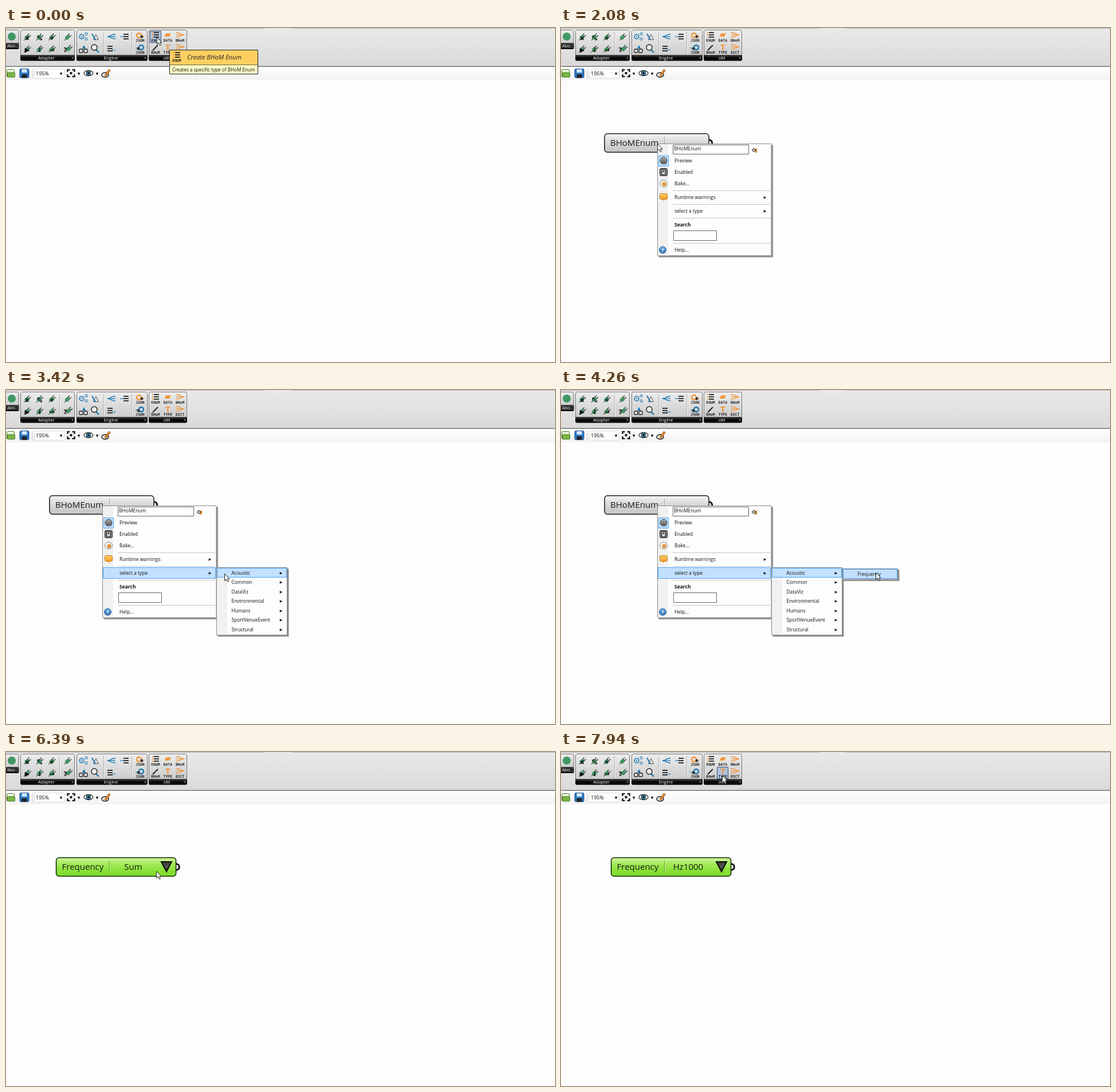
These frames come from a looping animation (958 px wide and 584 px high, 8000 ms). An HTML page with a canvas:

```html
<!DOCTYPE html>
<html lang="en">
<head>
<meta charset="utf-8">
<title>Enum component</title>
<style>
html, body { margin: 0; width: 100%; height: 100%; overflow: hidden; background: #fdfdfd; }
canvas { display: block; }
</style>
</head>
<body>
<canvas id="stage" width="958" height="584"></canvas>
<script>
const LOOP = 8000, STEP = 78, PITCH = 16.55;
const ctx = document.getElementById('stage').getContext('2d');
const BLUE = '#1b78b4', ORANGE = '#f0963c', GREEN = '#3f9864', INK = '#1a1a1a';
const HOVER = '#c2e0ff', HOVER_EDGE = '#4ba3f5';

const CONTEXT = { x: 168, y: 202, w: 199.5, h: 196.5 };
const TYPES = { x: 367, y: 310, w: 124, arrows: true, rows: ['Acoustic', 'Common', 'DataViz', 'Environmental', 'Humans', 'SportVenueEvent', 'Structural'] };
const FREQUENCY = { x: 491, y: 312, w: 97, rows: ['Frequency'] };
const BANDS = [63, 125, ...Array.from({ length: 7 }, (_, i) => 250 * 2 ** i)];
const VALUES = { x: 265, y: 199, w: 90, rows: ['Sum', ...BANDS.map(hz => 'Hz' + hz)] };

const START = { x: 263, y: 16 };
const TIME = { drag: 680, drop: 1570, context: 2080, types: 2940, frequency: 3810, typed: 4640, select: 5610, values: 6610, valued: 7550 };
const glides = [
  { from: TIME.drag, to: 1150, x: CONTEXT.x, y: CONTEXT.y },
  { from: 2260, to: 2540, x: 222, y: 320 },
  { from: 3170, to: 3660, x: 421, y: 321 },
  { from: TIME.frequency, to: 4260, x: 549, y: 319 },
  { from: 4810, to: 5530, x: 251, y: 197 },
  { from: 5760, to: 6150, x: 256, y: 288 },
  { from: 6150, to: 6540, x: 263, y: 198 },
  { from: TIME.values, to: 7240, x: 281, y: 289 },
  { from: TIME.valued, to: 7940, x: 281, y: 41 }
];

// ---- drawing helpers ----
function paint(fill, stroke, width = 1) {
  if (fill) { ctx.fillStyle = fill; ctx.fill(); }
  if (stroke) { ctx.strokeStyle = stroke; ctx.lineWidth = width; ctx.stroke(); }
}
function box(x, y, w, h, fill, stroke, radius = 0, width = 1) {
  ctx.beginPath();
  ctx.roundRect(x, y, w, h, radius);
  paint(fill, stroke, width);
}
function oval(x, y, rx, ry, fill, stroke, width) {
  ctx.beginPath();
  ctx.ellipse(x, y, rx, ry, 0, 0, Math.PI * 2);
  paint(fill, stroke, width);
}
const disc = (x, y, r, fill, stroke, width) => oval(x, y, r, r, fill, stroke, width);
function line(x, y, dx, dy, color, width) {
  ctx.beginPath();
  ctx.moveTo(x, y);
  ctx.lineTo(x + dx, y + dy);
  paint(null, color, width);
}
function text(str, x, y, size = 8.5, color = '#111', style = '', align = 'left', family = '"Open Sans", sans-serif') {
  ctx.font = `${style} ${size}px ${family}`;
  ctx.textAlign = align;
  ctx.fillStyle = color;
  ctx.fillText(str, x, y);
}
function glyph(char, x, y, size, color = '#111', style = '') {
  ctx.textBaseline = 'middle';
  text(char, x, y, size, color, style, 'center', '"DejaVu Sans", sans-serif');
  ctx.textBaseline = 'alphabetic';
}
const tag = (str, x, y) => text(str, x, y, 6.4, '#222', 'bold', 'center', '"DejaVu Sans Mono", monospace');
function shade(y, h, ...colors) {
  const g = ctx.createLinearGradient(0, y, 0, y + h);
  colors.forEach((c, i) => g.addColorStop(i / (colors.length - 1), c));
  return g;
}

// ---- icons, each around its centre ----
function plug(x, y) {
  ctx.save();
  ctx.translate(x, y);
  ctx.rotate(-Math.PI / 4);
  line(-8, 0, 8, 0, '#555', 1.3);
  box(-4.5, -3, 8, 6, GREEN, '#32704c', 3, .7);
  for (const side of [-2, 2]) line(3, side, 4, 0, '#333', 1.3);
  ctx.restore();
}
function bars(x, y, bullets) {
  for (const row of [-4, 0, 4]) {
    line(x - 3, y + row, 9, 0, '#333', 2);
    if (bullets) line(x - 6, y + row, 2, 0, ORANGE, 2);
  }
}
function fork(x, y, dir, color) {
  for (const arm of [-4, 0, 4]) {
    ctx.beginPath();
    ctx.moveTo(x - 7 * dir, y);
    ctx.bezierCurveTo(x, y, x - 3 * dir, y + arm, x + 7 * dir, y + arm);
    paint(null, color, 1.3);
  }
}
function json(x, y, color, side) {
  disc(x - side * 2, y - 2, 4, null, color, 2.4);
  disc(x + side * 3, y, 2.5, '#333');
  line(x + side * 4, y - 1, side * 4, 0, color, 1.2);
  tag('JSON', x, y + 8.5);
}
function cubes(x, y) {
  glyph('▲', x + 1, y - 4, 8, BLUE);
  for (const side of [-4, 4]) box(x + side - 3, y, 6, 6, '#ddd', '#222', 1, 1.3);
}
function magnifier(x, y) {
  line(x + 2, y + 2, 5, 5, BLUE, 2.4);
  disc(x - 1, y - 2, 5, '#eee', '#222', 1.4);
}
function enumIcon(x, y) {
  bars(x, y - 3, true);
  tag('ENUM', x, y + 8.5);
}

// ---- ribbon ----
function group(x, w, label, dividers) {
  box(x + .5, 3.5, w - 1, 53, shade(3, 47, '#ededed', '#cbcbcb'), '#777', 3);
  box(x, 47, w, 10.5, shade(47, 10, '#4a4a4a', '#050505', '#111'), null, [0, 0, 3, 3]);
  text(label, x + w / 2 - 2, 55, 7.8, '#fff', '', 'center');
  text('+', x + w - 4, 55, 8, '#ddd', '', 'center');
  for (const d of dividers) {
    line(x + d, 7, 0, 38, '#b2b2b2', 1);
    line(x + d + 1, 7, 0, 38, '#f3f3f3', 1);
  }
}

function adapterIcons() {
  [...'x⤡+ ▶↓→?'].forEach((mark, i) => {
    const col = i % 4, x = 37 + 21.5 * col + (col > 2 ? 6 : 0), y = 16 + 21 * (i >> 2);
    if (mark !== '?') plug(x, y);
    else plug(x + 2, y - 1);
    glyph(mark, x - (mark === '?' ? 4 : 0), y + 2, 11, '#111', 'bold');
  });
}

function engineIcons() {
  glyph('⚙', 132, 16, 14, BLUE, 'bold');
  for (const y of [11, 20]) glyph('⚙', 140, y, 8, BLUE, 'bold');
  glyph('△', 157, 16, 13, '#222');
  line(150, 10, 6, 11, BLUE, 2);
  fork(184, 15, 1, BLUE);
  bars(208, 15);
  line(199, 15, 6, 0, BLUE, 1.2);
  cubes(135, 37);
  magnifier(155, 36);
  bars(180, 36);
  glyph('→', 188, 39, 8, BLUE);
  json(234, 15, ORANGE, 1);
  json(234, 36, BLUE, -1);
}

function objectIcons(hot) {
  ['ENUM', 'DATA', 'BHoM', 'BHoM', 'TYPE', 'DICT'].forEach((name, i) => {
    const x = 261 + 21.3 * (i % 3), y = 15 + 21 * Math.floor(i / 3);
    if (name === hot) box(Math.round(x) - 9.5, y - 9.5, 19, 20, '#b0c2de', '#42536f');
    if (i === 0) bars(x, y - 3, true);
    else if (i === 1) glyph('▰', x, y - 3, 15, ORANGE);
    else if (i === 3) line(x - 5, y + 3, 9, -9, '#222', 2);
    else if (i === 4) text('T', x, y + 3, 15, ORANGE, 'bold', 'center');
    else fork(x, y - 3, -1, ORANGE);
    tag(name, x, y + 8.5);
  });
}

function ribbon(hot) {
  box(0, 0, 958, 67, shade(0, 67, '#e9e9e9', '#dadada'));
  box(0, 0, 958, 1, '#b2b2b2');
  box(451, 0, 47, 1, '#e2e2e2');
  box(0, 66.5, 958, 1.5, '#747474');
  box(-8, 3.5, 30, 33, shade(3, 27, '#ededed', '#c9c9c9'), '#777', 3);
  box(-8, 26, 30.5, 11, shade(26, 11, '#444', '#050505'), null, 2);
  text('Abo...', 2, 34, 7.5, '#fff');
  disc(10, 15, 7, GREEN);
  group(25, 95, 'Adapter', [68.5]);
  group(123, 124, 'Engine', [47.5, 96.5]);
  group(249, 67, 'oM', []);
  adapterIcons();
  engineIcons();
  objectIcons(hot);
}

function toolbar() {
  box(0, 68, 958, 23.5, shade(68, 23, '#fff', '#f2f2f2'));
  box(1.5, 72.5, 13, 13, '#e8f4d8', '#487828', 1);
  box(2.5, 78, 13, 8, '#79b843', '#487828', 1);
  box(24, 71.5, 16, 15.5, '#2b77c4', '#174a88', 2);
  box(27.5, 72, 9, 6, '#d5e7f7');
  box(27.5, 81, 9, 6, '#222');
  line(46, 71, 0, 17, '#ccc', 1);
  box(49.5, 71.5, 52, 16, '#fff', '#ddd');
  text('195%', 52, 83, 9);
  for (const x of [96, 127, 159]) glyph('▼', x, 80, 6);
  for (const sx of [-1, 1]) for (const sy of [-1, 1]) {
    line(113.5 + sx * 7, 79 + sy * 6, -sx * 5, 0, '#222', 2.4);
    line(113.5 + sx * 6, 79 + sy * 7, 0, -sy * 5, '#222', 2.4);
  }
  box(111.5, 77, 4, 4, '#222');
  oval(144, 79, 8, 4.5, '#fff', '#333', 1.3);
  disc(144, 79, 4, '#3a7fae', '#244');
  disc(144, 79, 1.8, '#111');
  oval(173, 82, 6, 4, null, '#222', 1.5);
  line(173, 84, 8, -11, '#8a4a18', 4);
  line(173, 84, 8, -11, '#dd8b35', 2.6);
}

function tooltip() {
  box(285.5, 38.5, 154, 42, '#ffffc8', '#222');
  box(286, 39, 153, 25, '#ffd061');
  line(286, 64.5, 153, 0, '#6e6034', 1);
  enumIcon(298, 50);
  text('Create BHoM Enum', 316, 55, 11.1, '#222', 'italic');
  text('Creates a specific type of BHoM Enum', 290, 76, 8.2);
}

// ---- canvas component ----
function component(x, right, name, value, green) {
  const top = 184.8, w = right - x;
  ctx.beginPath();
  ctx.arc(right + .5, 201, 5.3, -Math.PI / 2, Math.PI / 2);
  paint('#fff', '#111', 3);
  const fill = green
    ? shade(top, 32, '#d0f6a0', '#a4ea5c', '#8ce23a', '#7dda2c')
    : shade(top, 32, '#f5f5f5', '#e0e0e0', '#d0d0d0', '#c5c5c5');
  box(x, top, w, 32.4, fill, green ? '#12300a' : '#222', 5, 1.6);
  line(180.5, 190, 0, 22, green ? '#5fa324' : '#999', 1);
  line(181.5, 190, 0, 22, green ? '#c9f59a' : '#f2f2f2', 1);
  text(name, x + 10, 206, 15, INK);
  if (!value) return;
  text(value, 222, 206, 15, INK, '', 'center');
  ctx.beginPath();
  ctx.moveTo(271, 192);
  ctx.lineTo(289, 192);
  ctx.lineTo(280, 209);
  ctx.closePath();
  paint(shade(191, 19, '#333', '#555', '#222'), '#0c0c0c', 2);
}

// ---- menus ----
function panel({ x, y, w, h }) {
  box(x + 3, y + 3, w, h, 'rgba(0,0,0,.18)');
  box(x + 2, y + 2, w, h, 'rgba(0,0,0,.35)');
  box(x + .5, y + .5, w - 1, h - 1, '#fdfdfd', '#8c8c8c');
  box(x + 1, y + 1, 18, h - 2, '#f1f1f1');
}
const highlight = (x, y, w, h) => box(x + .5, y + .5, w - 1, h - 1, HOVER, HOVER_EDGE);

function listMenu({ x, y, w, rows, arrows }, cursor) {
  panel({ x, y, w, h: rows.length * PITCH + 3 });
  let hot = Math.floor((cursor.y - y - 1) / PITCH);
  if (cursor.x < x + 1) hot = -1;
  else if (cursor.x > x + w) hot = 0;
  rows.forEach((label, i) => {
    const top = Math.floor(y + 1 + i * PITCH);
    if (i === hot) highlight(x + 1, top, w - 2, 17);
    text(label, x + 26.5, top + 11.7, 8.4);
    if (arrows) glyph('▶', x + w - 11, top + 9, 6);
  });
}

function valueMenu(cursor) {
  listMenu(VALUES, cursor);
  highlight(VALUES.x + 2, VALUES.y + 2, 15, 15);
  glyph('✓', VALUES.x + 9.5, VALUES.y + 9.5, 9);
}

const menuIcons = {
  'Preview'(x, y) {
    highlight(x - 9, y - 9, 18, 19);
    disc(x, y, 6, shade(y - 6, 12, '#aaa', '#555'), '#444');
    box(x - 1, y + 2, 6, 4, '#666');
  },
  'Enabled'(x, y) {
    box(x - 6.5, y - 6.5, 13, 13, '#777', '#333', 2);
    box(x - 3, y - 4.5, 6, 9, '#ddd', '#222');
    box(x - 1, y - 3, 2, 3, '#222');
  },
  'Bake...'(x, y) {
    oval(x, y, 6.5, 6, '#f7f3ea', '#8c8478');
    disc(x + 1, y + 1, 3, ORANGE, '#c77d1d');
  },
  'Runtime warnings'(x, y) {
    glyph('▼', x, y + 4, 7, '#f39a25');
    box(x - 6.5, y - 6.5, 13, 10, shade(y - 6, 10, '#ffcb62', '#f39a25'), '#c57b20', 2);
  },
  'Help...'(x, y) {
    disc(x - 1.5, y, 6, shade(y - 6, 12, '#6ab5ec', '#2868b0'), '#2f6598');
    text('?', x - 1.5, y + 3.5, 9.5, '#fff', 'bold', 'center');
  }
};

function contextMenu(cursor, open) {
  const { x, y } = CONTEXT;
  panel(CONTEXT);
  box(195.5, 204.5, 132, 16, '#fff', '#666');
  text('BHoMEnum', 197, 214);
  box(339, 211, 3, 7, '#d88428');
  glyph('◆', 336.5, 213, 10, '#333');
  glyph('◆', 336.5, 213, 6, '#ddd');

  let mid = y + 10;
  for (const row of ['Preview', 'Enabled', 'Bake...', '-', 'Runtime warnings', '-', 'select a type', '-', 'Search', '', '-', 'Help...']) {
    if (row === '-') {
      line(195, mid + 12.5, 170, 0, '#c4c4c4', 1);
      mid += 4;
      continue;
    }
    mid += 20;
    const heading = row === 'Search', submenu = /warnings|type/.test(row);
    const under = cursor.x >= x && Math.abs(cursor.y - mid) < 10;
    if (row && !heading && (open ? row === 'select a type' : under)) highlight(x + 1, mid - 10, 197, 20);
    if (row) text(row, x + 30, mid + 3, 8.5, '#111', heading ? 'bold' : '');
    else box(x + 28.5, mid - 9.5, 75, 17, '#fff', '#666');
    if (submenu) glyph('▶', x + 188, mid, 6);
    menuIcons[row]?.(x + 11, mid);
  }
}

// ---- pointer ----
function pointerAt(t) {
  let { x, y } = START;
  for (const glide of glides) {
    if (t < glide.from) break;
    const done = (Math.floor((t - glide.from) / STEP) + 1) * STEP / (glide.to - glide.from + STEP);
    const eased = t >= glide.to ? 1 : 1 - (1 - done) ** 2;
    x += (glide.x - x) * eased;
    y += (glide.y - y) * eased;
  }
  return { x: Math.round(x), y: Math.round(y) };
}
function pointer({ x, y }, dragging) {
  ctx.save();
  ctx.translate(x + .5, y + .5);
  ctx.stroke(new Path2D());
  const arrow = new Path2D('M0 0V12L2.8 9.5L5 14L7 13L5 8.8H8.5Z');
  ctx.fillStyle = '#fff';
  ctx.fill(arrow);
  ctx.strokeStyle = '#222';
  ctx.lineWidth = 1;
  ctx.stroke(arrow);
  if (dragging) {
    ctx.setLineDash([1, 1]);
    box(4, 15, 11, 7, null, '#333');
  }
  ctx.restore();
}

function draw(t) {
  const within = (a, b) => t >= a && t < b;
  const cursor = pointerAt(t);
  box(0, 0, 958, 584, '#fdfdfd');
  ribbon(t < TIME.drag ? 'ENUM' : t > TIME.valued && cursor.y < 46 ? 'TYPE' : '');
  toolbar();
  if (t < TIME.drag) tooltip();

  if (within(TIME.drop, TIME.typed)) component(76, 258, 'BHoMEnum');
  if (t >= TIME.typed) component(87.6, 296.6, 'Frequency', t < TIME.valued ? 'Sum' : 'Hz1000', t >= TIME.select);

  if (within(TIME.context, TIME.typed)) contextMenu(cursor, t >= TIME.types);
  if (within(TIME.types, TIME.typed)) {
    ctx.globalAlpha = t < TIME.types + 90 ? 0.5 : 1;
    listMenu(TYPES, cursor);
    ctx.globalAlpha = 1;
  }
  if (within(TIME.frequency, TIME.typed)) listMenu(FREQUENCY, cursor);
  if (within(TIME.values, TIME.valued)) valueMenu(cursor);
  pointer(cursor, within(TIME.drag, TIME.drop));
}

function tick() {
  draw(performance.now() % LOOP);
  requestAnimationFrame(tick);
}
tick();
</script>
</body>
</html>
```
